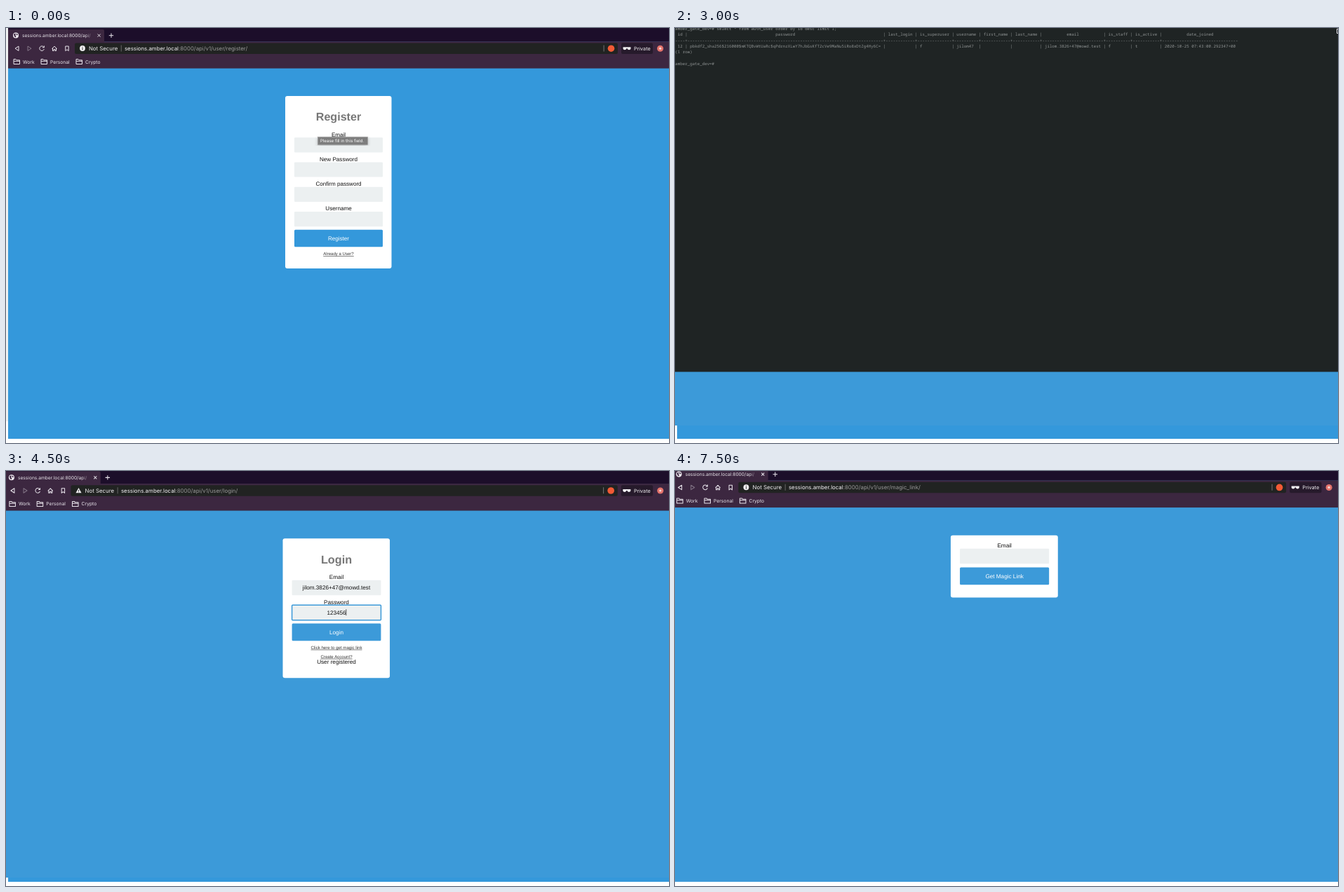
Write an HTML page that moves like this. It is 945 px wide and 592 px high and loops after 8 s.

```html
<!DOCTYPE html>
<html lang="en">
<head>
<meta charset="utf-8">
<title>Account sign-up walkthrough</title>
<style>
  html, body { margin: 0; width: 100%; height: 100%; overflow: hidden; background: #fff; }
  svg { display: block; width: 945px; height: 592px; }
  text { white-space: pre; text-rendering: geometricPrecision; }
  .ui { font-family: Inter, "Open Sans", sans-serif; }
  .form { font-family: "Liberation Sans", Arial, sans-serif; text-anchor: middle; }
  .term { font: 5.827px "Noto Sans Mono", "DejaVu Sans Mono", monospace; fill: #8e9292; }
  .bold { font-weight: bold; }
  .link { text-decoration: underline; }
  .line { fill: none; stroke: #e9e5ec; stroke-width: 1; stroke-linejoin: round; }
</style>
</head>
<body>
<svg id="stage" viewBox="0 0 945 592">
  <defs>
    <linearGradient id="fade">
      <stop offset="0" stop-color="#3c2740" stop-opacity="0"/>
      <stop offset="1" stop-color="#3c2740"/>
    </linearGradient>
    <clipPath id="portrait"><circle cx="473" cy="168" r="64"/></clipPath>
    <filter id="shadow" x="-10%" y="-10%" width="120%" height="120%">
      <feDropShadow dx="0" dy="1.5" stdDeviation="2" flood-opacity=".25"/>
    </filter>
  </defs>
</svg>
<script>
const HOST = 'sessions.amber.local';
const EMAIL = 'jilom.3826+47@mowd.test';
const USER = 'jilom47';
const DATABASE = 'amber_gate_dev';
const DEEP_BLUE = '#3498db', BLUE = '#3c9ad9', GREY = '#777';
const MIDDLE = 474;
const LOOP = 8000, STEP = 1500;

const rect = (x, y, w, h, fill, extra = '') =>
  `<rect x="${x}" y="${y}" width="${w}" height="${h}" fill="${fill}" ${extra}/>`;
const circle = (x, y, r, fill) => `<circle cx="${x}" cy="${y}" r="${r}" fill="${fill}"/>`;
const shape = (d, fill) => `<path d="${d}" fill="${fill}"/>`;
const line = (d, extra = '') => `<path class="line" d="${d}" ${extra}/>`;
const text = (cls, x, y, size, fill, content) =>
  `<text class="${cls}" x="${x}" y="${y}" font-size="${size}" fill="${fill}">${content}</text>`;
const place = (x, y, scale, content) =>
  `<g transform="translate(${x} ${y}) scale(${scale})">${content}</g>`;

// Browser chrome
const folder = x => line(`M${x} 51.5v-7h3l1 1.3h4.5v5.7zM${x} 47.3h8.5`, 'stroke-width=".9"');

const infoIcon = circle(109, 29, 3.9, '#f2f0f3') + rect(108.5, 28.5, 1, 2.7, '#222') + rect(108.5, 26.7, 1, 1, '#222');
const warnIcon = shape('M109 25.3l4 7.2h-8z', '#f2f0f3') + rect(108.6, 28, .9, 2.2, '#222') + rect(108.6, 30.8, .9, .8, '#222');

const globe = circle(14, 10.5, 4, '#eeeaf0') +
  shape('M11 9q2-2 3-.5l-1 1.8 1.5 1-1 2.2q-2-1-2.5-4.5M15 7.5l2 2-1 1-1.5-1.2z', '#3c2740');

const navigation =
  line('M18 26v6.4l-5-3.2z') +
  line('M31 26v6.4l5-3.2z', 'opacity=".4"') +
  line('M53.8 27.2a3.3 3.3 0 1 0 .5 2.8M54.4 25.4v2.4h-2.5') +
  line('M65.5 29.5l3.5-3.4 3.5 3.4M66.5 29v3.5h1.6v-2h1.8v2h1.6v-3.5') +
  line('M84.8 26h4.4v6.6l-2.2-1.8-2.2 1.8z');

const chrome = (path, icon) =>
  rect(-20, -10, 1000, 29.5, '#1c0e2a') +
  rect(-20, 19.3, 1000, 38.3, '#3c2740') +
  rect(3, 2, 137, 20, '#3c2740', 'rx="2"') +
  globe +
  text('ui', 23, 13, 6.6, '#e6e2e8', `${HOST}:8000/api/`) +
  rect(113, 5, 12, 11, 'url(#fade)') +
  line('M130.6 8.6l4 4m0-4l-4 4') +
  line('M146.8 10.7h6.4m-3.2-3.2v6.4', 'stroke-width="1.2"') +
  navigation +
  rect(98, 21.5, 774, 15.5, '#212322', 'rx="2"') +
  icon +
  text('ui', 118, 31.9, 7.8, '#eeecef', 'Not Secure') +
  rect(163.8, 24.5, .8, 9, '#777') +
  text('ui', 169, 31.9, 7.8, '#f4f2f5', `${HOST}<tspan fill="#999">:8000/api/v1/user/${path}/</tspan>`) +
  rect(851.7, 24.5, .8, 9, '#888') +
  circle(862.5, 29.2, 4.8, '#f15a35') +
  rect(877, 21.5, 45, 15.5, '#261a2b', 'rx="2"') +
  shape('M879.5 27.2h11v2.3q-.4 1.8-2.4 1.8t-2.6-2h-1q-.5 2-2.6 2t-2.4-1.8z', '#f0eef1') +
  text('ui', 895, 31.8, 7.2, '#f0eef1', 'Private') +
  circle(932.5, 29.2, 4.5, '#e4746c') + circle(932.5, 29.2, 1.6, '#f8d8d4') +
  [['Work', 11], ['Personal', 50], ['Crypto', 100]].map(([name, x]) =>
    folder(x) + text('ui', x + 13, 50.5, 6.7, '#e9e5ec', name)).join('');

// Form parts
const card = height => rect(398, 97, 151.5, height, '#fff', 'rx="3"');
const title = content => text('form bold', MIDDLE, 132.3, 16.1, GREY, content);
const caption = (y, content) => text('form', MIDDLE, y, 8.1, '#111', content);
const link = (y, content) => text('form link', MIDDLE, y, 6.07, '#333', content);
const field = (y, name, value = '', extra = '') =>
  caption(y - 1.6, name) +
  rect(411, y, 126, 21.2, '#ecf0f1', `rx="1" ${extra}`) +
  caption(y + 13.5, value);
const button = (y, name, fill) =>
  rect(411, y, 126, 24.5, fill, 'rx="1.5"') + text('form', MIDDLE, y + 15.2, 8.1, '#fff', name);

const registerForm = (blue, email = '', password = '', user = '') =>
  card(246) + title('Register') +
  field(156.2, 'Email', email) +
  field(191.4, 'New Password', password) +
  field(226.7, 'Confirm password', password) +
  field(262, 'Username', user) +
  button(287.7, 'Register', blue) +
  link(324, 'Already a User?');

const tooltip =
  rect(444.5, 155.6, 71, 11, '#7d7d7d', 'stroke="#999" stroke-width=".6" filter="url(#shadow)"') +
  text('ui', 448, 163.2, 6.1, '#fff', 'Please fill in this field.');

const loginForm =
  card(197.6) + title('Login') +
  field(156.2, 'Email', EMAIL) +
  field(191.4, 'Password', '123456', `stroke="${BLUE}" stroke-width="1.5"`) +
  rect(487.4, 197.3, .7, 8.8, '#111') +
  button(217.4, 'Login', BLUE) +
  link(253.4, 'Click here to get magic link') +
  link(266.3, 'Create Account?') +
  caption(274.7, 'User registered');

const linkForm = card(88) + field(115.8, 'Email') + button(142.2, 'Get Magic Link', BLUE);

// Profile page
const avatar = `<g clip-path="url(#portrait)">` +
  circle(473, 168, 64, '#c9cfe1') +
  shape('M425 217L455 208.5 473 232 490 208.5 521 217V235H425z', '#888b94') +
  shape('M455 207.5L447 219 473 233 499 219 490 207.5z', '#cccfd7') +
  shape('M455.5 180H490.5V208.5L473 232 455.5 208.5z', '#fff') +
  shape('M459 198Q473 208 490.5 184V208Q474 210 459 198z', '#e5e8ee') +
  shape('M450 155Q445 158 447 168 448 175 451.5 176 454 190 464 199 473 205 482 199 492 190 494 176 498 175 498.5 166 499 157 495 156L490 138H455z', '#fff') +
  shape('M449.500 170Q444 152 447 139 449 132 453 130 459 119 475 119.500 489 119 499 125.500L496 126.500Q505 132 505.500 144 502.500 142 502.500 142 503 153 496.500 170L495.500 159 489 141.500Q485 145 472 144.500 463 146 456 140.500L451 153z', '#6f727d') +
  `</g>`;

const profile =
  rect(397, 92, 152, 235, '#fff', 'filter="url(#shadow)"') +
  avatar +
  text('form bold', 473, 269.7, 16.2, '#000', USER) +
  text('form', 473, 293.2, 9.13, '#808080', EMAIL) +
  rect(397, 304.5, 152, 22.5, '#000') +
  text('form', 473, 319.2, 9.3, '#fff', 'Logout');

// Database terminal: [column, width, value]
const columns = [
  ['id', 4, '12'],
  ['password', 80, 'pbkdf2_sha256$216000$mKTQBvWtUaRc$qPdrnzXLwY7hJbGsKfT2cVe9MaNu5iRo8xDtZg4Hy6C='],
  ['last_login', 12, ''], ['is_superuser', 14, 'f'], ['username', 10, USER],
  ['first_name', 12, ''], ['last_name', 11, ''], ['email', 25, EMAIL],
  ['is_staff', 10, 'f'], ['is_active', 11, 't'],
  ['date_joined', 31, '2020-10-25 07:43:00.292347+00'],
];
const centred = (s, width) => s.padStart(s.length + Math.floor((width - s.length) / 2)).padEnd(width);
const terminalLines = [
  `${DATABASE}=# select * from auth_user order by id desc limit 1;`,
  columns.map(([name, width]) => centred(name, width)).join('|'),
  columns.map(([, width]) => '-'.repeat(width)).join('+'),
  columns.map(([, width, value]) => ` ${value}`.padEnd(width)).join('|'),
  '(1 row)', '', `${DATABASE}=#`,
];
const terminal =
  rect(0, 0, 945, 490.5, '#1f2424') +
  terminalLines.map((s, i) => `<text class="term" x=".3" y="${3 + i * 8.37}">${s}</text>`).join('') +
  line('M946 1.500h-2.500v6h2.500');

// Scenes
const backdrop = rect(0, 0, 945, 592, '#fff') + rect(3, 0, 942, 586, DEEP_BLUE);
const bluePage = bottom => backdrop + rect(0, 0, 945, bottom, BLUE);

const scenes = [
  backdrop + chrome('register', infoIcon) + registerForm(DEEP_BLUE) + tooltip +
    rect(0, 0, 3, 561, '#eef0f1'),
  bluePage(567) + place(-9.5, -4.5, 1.01,
    chrome('register', warnIcon) + registerForm(BLUE, EMAIL, '123456', USER)),
  bluePage(567) + terminal,
  bluePage(580) + place(-6.2, -1.4, 1.0068, chrome('login', warnIcon) + loginForm),
  bluePage(580) + rect(0, 0, 945, 566, '#fff') +
    place(-2.9, -5.3, 1.005, chrome('details', infoIcon)) + profile,
  bluePage(586) + place(-8.5, -6, 1.0087, chrome('magic_link', infoIcon) + linkForm),
];

const stage = document.getElementById('stage');
stage.insertAdjacentHTML('beforeend',
  scenes.map(s => `<g class="scene" display="none">${s}</g>`).join(''));
const layers = [...stage.querySelectorAll('.scene')];

function draw() {
  const current = Math.floor(performance.now() % LOOP / STEP);
  layers.forEach((layer, i) => layer.setAttribute('display', i === current ? 'inline' : 'none'));
  requestAnimationFrame(draw);
}
draw();
</script>
</body>
</html>
```
